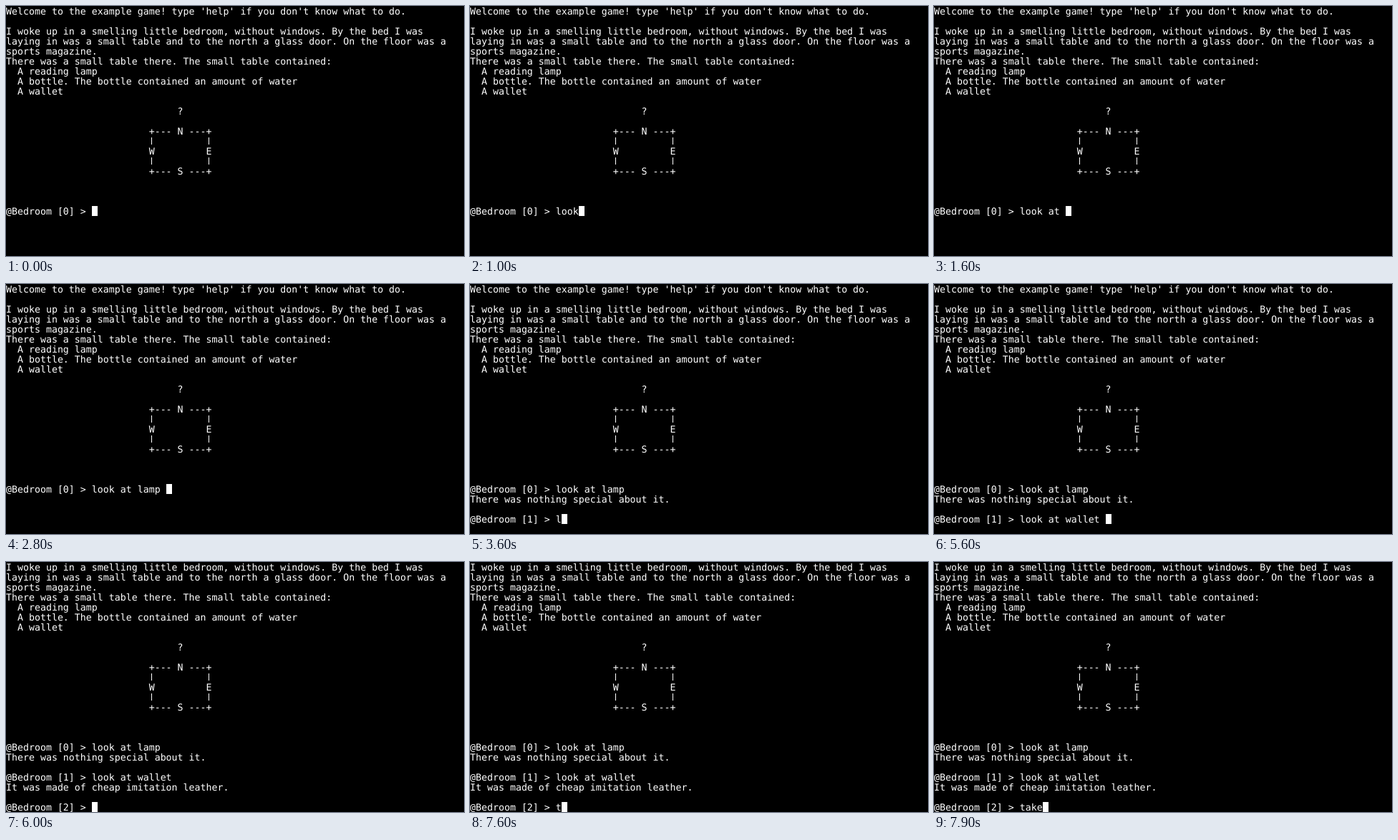
Write an HTML page that moves like this. It is 640 px wide and 350 px high and loops after 8 s.

```html
<!DOCTYPE html>
<html lang="en">
<head>
<meta charset="utf-8">
<title>Text adventure</title>
<style>
  html, body { margin: 0; width: 100%; height: 100%; overflow: hidden; background: #000; }
  svg { display: block; width: 640px; height: 350px; background: #000; fill: #fff; }
  text {
    font: 13.288px "DejaVu Sans Mono", monospace;
    white-space: pre;
    font-kerning: none;
    font-variant-ligatures: none;
    text-rendering: geometricPrecision;
  }
</style>
</head>
<body>
<svg viewBox="0 0 640 350"><g id="screen"></g></svg>
<script>
const CELL_W = 8, CELL_H = 14, ROWS = 25, BASELINE = 12, LOOP = 8000;

const pad = ' '.repeat(25);
const intro = [
  "Welcome to the example game! type 'help' if you don't know what to do.",
  '',
  'I woke up in a smelling little bedroom, without windows. By the bed I was',
  'laying in was a small table and to the north a glass door. On the floor was a',
  'sports magazine.',
  'There was a small table there. The small table contained:',
  '  A reading lamp',
  '  A bottle. The bottle contained an amount of water',
  '  A wallet',
  '',
  pad + '     ?',
  '',
  pad + '+--- N ---+',
  '',
  pad + 'W         E',
  '',
  pad + '+--- S ---+',
  '', '', '',
  '@Bedroom [0] > '
].join('\n');

// [time in ms, text added to the terminal]
const steps = [
  [0, intro],
  [500, 'l'], [700, 'o'], [900, 'o'], [1000, 'k'],
  [1300, ' '], [1400, 'a'], [1600, 't '],
  [2500, 'l'], [2600, 'am'], [2800, 'p '],
  [3000, '\n'],
  [3100, 'There was nothing special about it.\n\n@Bedroom [1] > '],
  [3600, 'l'], [3800, 'o'], [3900, 'o'], [4000, 'k'],
  [4300, ' '], [4800, 'a'], [5000, 't'], [5100, ' '], [5200, 'w'],
  [5400, 'a'], [5600, 'llet '],
  [6000, '\nIt was made of cheap imitation leather.\n\n@Bedroom [2] > '],
  [7600, 't'], [7700, 'a'], [7800, 'k'], [7900, 'e']
];

const screen = document.getElementById('screen');

function add(tag, attrs) {
  const el = document.createElementNS('http://www.w3.org/2000/svg', tag);
  for (const key in attrs) el.setAttribute(key, attrs[key]);
  return screen.appendChild(el);
}

const lines = Array.from({ length: 27 }, (_, row) =>
  add('text', { x: 0, y: row * CELL_H + BASELINE }));

// Short vertical bars of the compass
for (const row of [13, 15])
  for (const col of [25, 35])
    add('rect', { x: col * CELL_W + 3, y: row * CELL_H + 2, width: 1, height: 10 });

const cursor = add('rect', { width: CELL_W, height: CELL_H });

function render(text) {
  const rows = text.split('\n');
  const last = rows.length - 1;
  lines.forEach((line, i) => { line.textContent = rows[i] || ''; });
  cursor.setAttribute('x', rows[last].length * CELL_W);
  cursor.setAttribute('y', last * CELL_H);
  const scroll = Math.max(0, rows.length - ROWS);
  screen.setAttribute('transform', `translate(0 ${-scroll * CELL_H})`);
}

const start = performance.now();
let shown = 0;

function tick() {
  const t = (performance.now() - start) % LOOP;
  const count = steps.filter(([time]) => time <= t).length;
  if (count !== shown) {
    shown = count;
    render(steps.slice(0, count).map(([, text]) => text).join(''));
  }
  requestAnimationFrame(tick);
}
tick();
</script>
</body>
</html>
```
